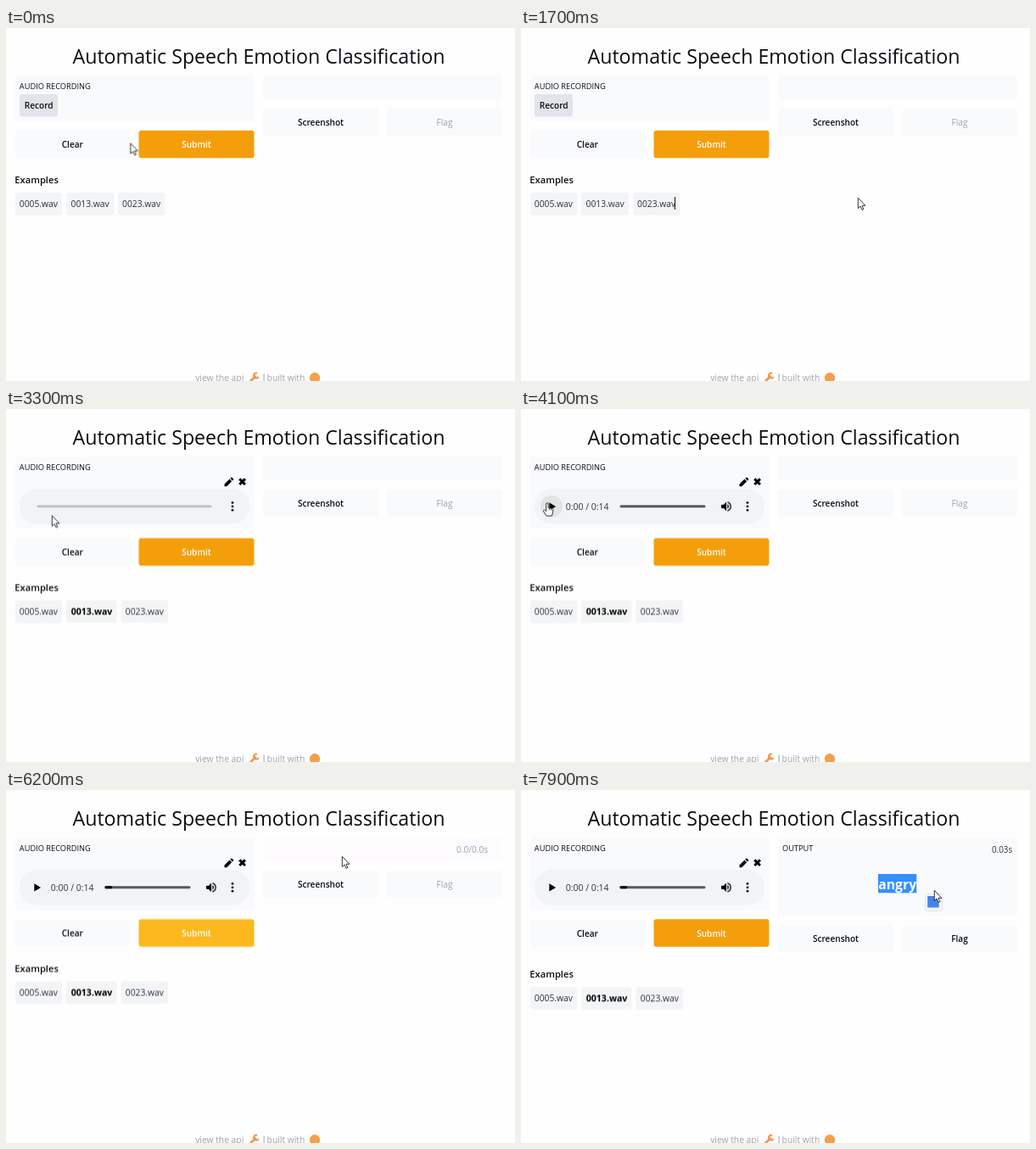
An HTML page for the animation above (8000 ms loop, 600 by 416 pixels).

```html
<!DOCTYPE html>
<html lang="en">
<head>
<meta charset="utf-8">
<title>Speech emotion demo</title>
<style>
html, body { margin: 0; width: 100%; height: 100%; overflow: hidden; background: #fefefe; }
svg { display: block; width: 600px; height: 416px; }
text { font: 10.3px "Open Sans", "Noto Sans", sans-serif; fill: #0b0d12; }
.title { font-size: 23.2px; text-anchor: middle; }
.label { font-size: 9.25px; font-weight: 500; }
.btn { font-size: 10.1px; font-weight: 600; text-anchor: middle; }
.head { font-size: 11.2px; font-weight: 600; }
.wav { fill: #2b313b; }
.pick { font-size: 10.6px; font-weight: 700; fill: #000; }
.foot { fill: #9fa2a7; }
.word { font-size: 15.8px; font-weight: 700; text-anchor: middle; fill: #1f2937; }
.sel { fill: #fff; }
.dim { fill: #9ca3af; }
.panel { fill: #f9fafc; }
.chip { fill: #f3f4f6; }
.caret { fill: #111; }

/* every 1.25% is one 100 ms tick */
.k, .before, .after, .idle, .done { animation: 8s step-end infinite; }
.before { animation-name: before; }
.after { animation-name: after; }
.idle { animation-name: idle; }
.done { animation-name: done; }
@keyframes before { 0% { opacity: 1 } 31.25%, 100% { opacity: 0 } }
@keyframes after { 0% { opacity: 0 } 31.25%, 100% { opacity: 1 } }
@keyframes idle { 0% { opacity: 1 } 78.75%, 100% { opacity: 0 } }
@keyframes done { 0% { opacity: 0 } 78.75%, 100% { opacity: 1 } }

#actions { animation-name: actions; }
@keyframes actions { 0% { transform: none } 31.25%, 100% { transform: translateY(31.5px) } }
#examples { animation-name: examples; }
@keyframes examples {
  0% { transform: none }
  31.25% { transform: translateY(31.5px) }
  78.75%, 100% { transform: translateY(38.3px) }
}
#submit { fill: #f59e0b; animation-name: submit; }
@keyframes submit {
  0%, 3.75%, 78.75%, 100% { fill: #f59e0b }
  1.25%, 71.25% { fill: #fbb81f }
}
#waiting { animation-name: waiting; }
@keyframes waiting { 0%, 78.75%, 100% { opacity: 0 } 75% { opacity: 1 } }

#loading { animation-name: loading; }
@keyframes loading { 0% { opacity: 1 } 50%, 100% { opacity: 0 } }
#ready { animation-name: ready; }
@keyframes ready { 0% { opacity: 0 } 50%, 100% { opacity: 1 } }
#halo { animation-name: halo; }
@keyframes halo { 0%, 67.5%, 100% { opacity: 0 } 50% { opacity: 1 } }
#play { animation-name: play; }
@keyframes play { 0%, 66.25%, 100% { opacity: 1 } 57.5% { opacity: 0 } }
#pause { animation-name: pause; }
@keyframes pause { 0%, 66.25%, 100% { opacity: 0 } 57.5% { opacity: 1 } }
#played { transform-box: fill-box; transform-origin: left; animation-name: played; }
@keyframes played {
  0% { transform: scaleX(0) }
  56.25% { transform: scaleX(0); animation-timing-function: steps(3) }
  60% { transform: scaleX(.6) }
  62.5% { transform: scaleX(.8) }
  65%, 100% { transform: scaleX(1) }
}

#caret1 { animation-name: caret1; }
@keyframes caret1 { 0%, 26.25%, 100% { opacity: 0 } 20% { opacity: 1 } }
#caret2 { animation-name: caret2; }
@keyframes caret2 { 0%, 38.75%, 50%, 100% { opacity: 0 } 31.25%, 46.25% { opacity: 1 } }

#select { animation-name: select; }
@keyframes select {
  0% { clip-path: inset(0 100% 0 0) }
  90% { clip-path: inset(0 100% 0 0); animation-timing-function: steps(3) }
  93.75%, 100% { clip-path: inset(0 0 0 0) }
}
#popup { animation-name: popup; }
@keyframes popup { 0% { opacity: 0 } 96.25%, 100% { opacity: 1 } }

#cursor { animation-name: path; }
@keyframes path {
  0% { transform: translate(146.5px, 135.5px); animation-timing-function: steps(8) }
  10% { transform: translate(331px, 25px) }
  11.25% { transform: translate(331px, 25px); animation-timing-function: steps(2) }
  13.75% { transform: translate(362px, 15px); animation-timing-function: steps(3) }
  17.5% { transform: translate(427px, 112px); animation-timing-function: steps(2) }
  20% { transform: translate(402px, 196px) }
  21.25% { transform: translate(397px, 200px) }
  22.5% { transform: translate(284px, 200px); animation-timing-function: steps(4) }
  27.5% { transform: translate(95px, 205px); animation-timing-function: steps(2) }
  30% { transform: translate(83px, 203px) }
  31.25% { transform: translate(82px, 199px) }
  32.5% { transform: translate(82px, 197px) }
  33.75% { transform: translate(82px, 197px); animation-timing-function: steps(2) }
  36.25% { transform: translate(86px, 184px); animation-timing-function: steps(6) }
  43.75% { transform: translate(38px, 96px) }
  45% { transform: translate(33px, 108px) }
  46.25% { transform: translate(28px, 110.5px) }
  50% { transform: translate(31px, 111px) }
  53.75% { transform: translate(30px, 111px) }
  66.25% { transform: translate(30px, 111px); animation-timing-function: steps(5) }
  72.5% { transform: translate(215px, 168px) }
  73.75% { transform: translate(215px, 168px) }
  75% { transform: translate(245px, 155px) }
  76.25% { transform: translate(330px, 106px) }
  77.5% { transform: translate(396px, 78px); animation-timing-function: steps(6) }
  85% { transform: translate(436px, 134px); animation-timing-function: steps(3) }
  88.75% { transform: translate(417px, 111px) }
  90% { transform: translate(417px, 111px); animation-timing-function: steps(3) }
  93.75%, 100% { transform: translate(487px, 118px) }
}
#arrow { animation-name: arrow; }
@keyframes arrow {
  0%, 2.5%, 13.75%, 31.25%, 67.5%, 76.25%, 93.75%, 100% { opacity: 1 }
  1.25%, 8.75%, 26.25%, 45%, 71.25%, 86.25% { opacity: 0 }
}
#hand { animation-name: hand; }
@keyframes hand {
  0%, 2.5%, 31.25%, 67.5%, 76.25%, 100% { opacity: 0 }
  1.25%, 26.25%, 45%, 71.25% { opacity: 1 }
}
#beam { animation-name: beam; }
@keyframes beam {
  0%, 13.75%, 93.75%, 100% { opacity: 0 }
  8.75%, 86.25% { opacity: 1 }
}
</style>
</head>
<body>
<svg viewBox="0 0 600 416">
  <text class="title" x="298" y="41.7">Automatic Speech Emotion Classification</text>

  <!-- recording panel -->
  <g class="before">
    <rect class="panel" x="11" y="56" width="281.5" height="54" rx="3"/>
    <rect x="16" y="78" width="45" height="26.5" rx="3" fill="#e3e4e9"/>
    <text class="btn" x="38.7" y="95">Record</text>
  </g>
  <g class="after">
    <rect class="panel" x="11" y="56" width="281.5" height="85" rx="3"/>
    <path d="M257.5 91.3v-2.7l6-6 2.7 2.7-6 6zM264.3 81.8l1-1q.6-.5 1.2 0l1.5 1.5q.5.6 0 1.2l-1 1z"/>
    <path d="M275.3 82.4l6.6 6.6m0-6.6l-6.6 6.6" stroke="#000" stroke-width="3"/>
    <rect x="16" y="94" width="271" height="41.5" rx="20.7" fill="#f1f3f4"/>
    <g id="loading" class="k">
      <rect x="36.5" y="113.3" width="206" height="3" rx="1.5" fill="#c0c2c4"/>
    </g>
    <g id="ready" class="k">
      <circle id="halo" class="k" cx="36" cy="114.8" r="13" fill="#e1e3e4"/>
      <path id="play" class="k" d="M33.3 110.3l7.8 4.6-7.8 4.6z"/>
      <path id="pause" class="k" d="M33 110.4h2.4v9H33zM38 110.4h2.4v9H38z"/>
      <text x="52.7" y="118.5" style="font-size:10.5px;fill:#34383c">0:00 / 0:14</text>
      <rect x="116.5" y="113.3" width="101" height="3" rx="1.5" fill="#58595d"/>
      <rect id="played" class="k" x="116.5" y="113.3" width="8.7" height="3" rx="1.2"/>
      <path transform="translate(234.1 106.8) scale(.66)" d="M3 9v6h4l5 5V4L7 9zM16.5 12c0-1.77-1.02-3.29-2.5-4.03v8.05c1.48-.73 2.5-2.25 2.5-4.02zM14 3.23v2.06c2.89.86 5 3.54 5 6.71s-2.11 5.85-5 6.71v2.06c4.01-.91 7-4.49 7-8.77s-2.99-7.86-7-8.77z"/>
    </g>
    <circle cx="267" cy="110.4" r="1.4"/>
    <circle cx="267" cy="114.8" r="1.4"/>
    <circle cx="267" cy="119.2" r="1.4"/>
  </g>
  <text class="label" x="15.8" y="72.3">AUDIO RECORDING</text>

  <g id="actions" class="k">
    <rect class="panel" x="11" y="120.7" width="135" height="32.5" rx="3"/>
    <text class="btn" x="78.3" y="141">Clear</text>
    <rect id="submit" class="k" x="156.5" y="120.7" width="136" height="32.5" rx="3"/>
    <text class="btn" x="224.5" y="141" style="fill:#fff">Submit</text>
  </g>

  <g id="examples" class="k">
    <text class="head" x="10.3" y="183">Examples</text>
    <rect class="chip" x="11" y="194" width="55" height="26.5" rx="3"/>
    <text class="wav" x="15.8" y="211">0005.wav</text>
    <g class="before">
      <rect class="chip" x="71" y="194" width="56" height="26.5" rx="3"/>
      <text class="wav" x="76.5" y="211">0013.wav</text>
      <rect class="chip" x="132" y="194" width="55.5" height="26.5" rx="3"/>
      <text class="wav" x="137" y="211">0023.wav</text>
      <rect id="caret1" class="caret k" x="181" y="199" width="1" height="15"/>
    </g>
    <g class="after">
      <rect class="chip" x="71" y="194" width="59.5" height="26.5" rx="3"/>
      <text class="wav pick" x="76.7" y="211">0013.wav</text>
      <rect class="chip" x="135.7" y="194" width="55.5" height="26.5" rx="3"/>
      <text class="wav" x="140.8" y="211">0023.wav</text>
      <rect id="caret2" class="caret k" x="82.3" y="199.5" width="1" height="15"/>
    </g>
  </g>

  <!-- result panel -->
  <g class="idle">
    <rect class="panel" x="303" y="56" width="282" height="28" rx="3"/>
    <g id="waiting" class="k">
      <rect x="303" y="56" width="282" height="28" rx="3" fill="#fdfbfd"/>
      <text class="dim" x="531" y="74" style="font-size:10.1px">0.0/0.0s</text>
    </g>
    <rect class="panel" x="303" y="95" width="136" height="32" rx="3"/>
    <text class="btn" x="371" y="115.3">Screenshot</text>
    <rect class="panel" x="449" y="95" width="136" height="32" rx="3"/>
    <text class="btn dim" x="517" y="115.3" style="font-weight:500">Flag</text>
  </g>
  <g class="done">
    <rect class="panel" x="303" y="56" width="282" height="92" rx="3"/>
    <text class="label" x="308" y="72.3">OUTPUT</text>
    <text x="579.2" y="74" text-anchor="end" style="font-size:9.9px;fill:#33383f">0.03s</text>
    <text class="word" x="443.7" y="117">angry</text>
    <g id="select" class="k">
      <rect x="421" y="99" width="45.5" height="22.3" fill="#3390ff"/>
      <text class="word sel" x="443.7" y="117">angry</text>
    </g>
    <rect class="panel" x="303" y="159" width="136" height="32" rx="3"/>
    <text class="btn" x="371" y="179.3">Screenshot</text>
    <rect class="panel" x="449" y="159" width="136" height="32" rx="3"/>
    <text class="btn" x="517" y="179.3">Flag</text>
  </g>

  <!-- footer -->
  <text class="foot" x="223.2" y="416">view the api</text>
  <path d="M288 416.5l5.8-5.8" stroke="#ee9a55" stroke-width="3" stroke-linecap="round"/>
  <path d="M296 406.9a2.9 2.9 0 1 0 1.6 4" fill="none" stroke="#ee9a55" stroke-width="2.2"/>
  <rect x="303.6" y="407.5" width="1" height="9" fill="#9fa2a7"/>
  <text class="foot" x="307.6" y="416">built with</text>
  <circle cx="364" cy="412.3" r="6.2" fill="#f3a04c"/>

  <g id="popup" class="k">
    <rect x="476.7" y="122.5" width="20" height="20" rx="2" fill="#f5f5f7" stroke="#dcdde0" stroke-width=".8"/>
    <rect x="479.2" y="125" width="13.5" height="13.5" fill="#4285f0"/>
  </g>

  <g id="cursor" class="k">
    <path id="arrow" class="k" d="M.3.3v12.3l2.8-2.6 1.9 4.3 1.9-.8-1.9-4.2h3.9z" fill="#fff" stroke="#222" stroke-width=".9"/>
    <path id="hand" class="k" d="M-1.3 9V.8q0-1.2 1.2-1.2T1.1.8v4.4l4.4 1q1.4.4 1.3 1.8l-.5 4-1.1 3H-.8l-3.4-5q-.8-1.6.4-2 .9-.2 2.5 1.6zM2.4 5.6v2.6M4.5 6v2.4" fill="#fff" stroke="#222" stroke-width=".9"/>
    <path id="beam" class="k" d="M-3-6.5h2.2L0-6l.8-.5H3M0-6V6M-3 6.5h2.2L0 6l.8.5H3" fill="none" stroke="#333" stroke-width="1.1"/>
  </g>
</svg>
</body>
</html>
```
